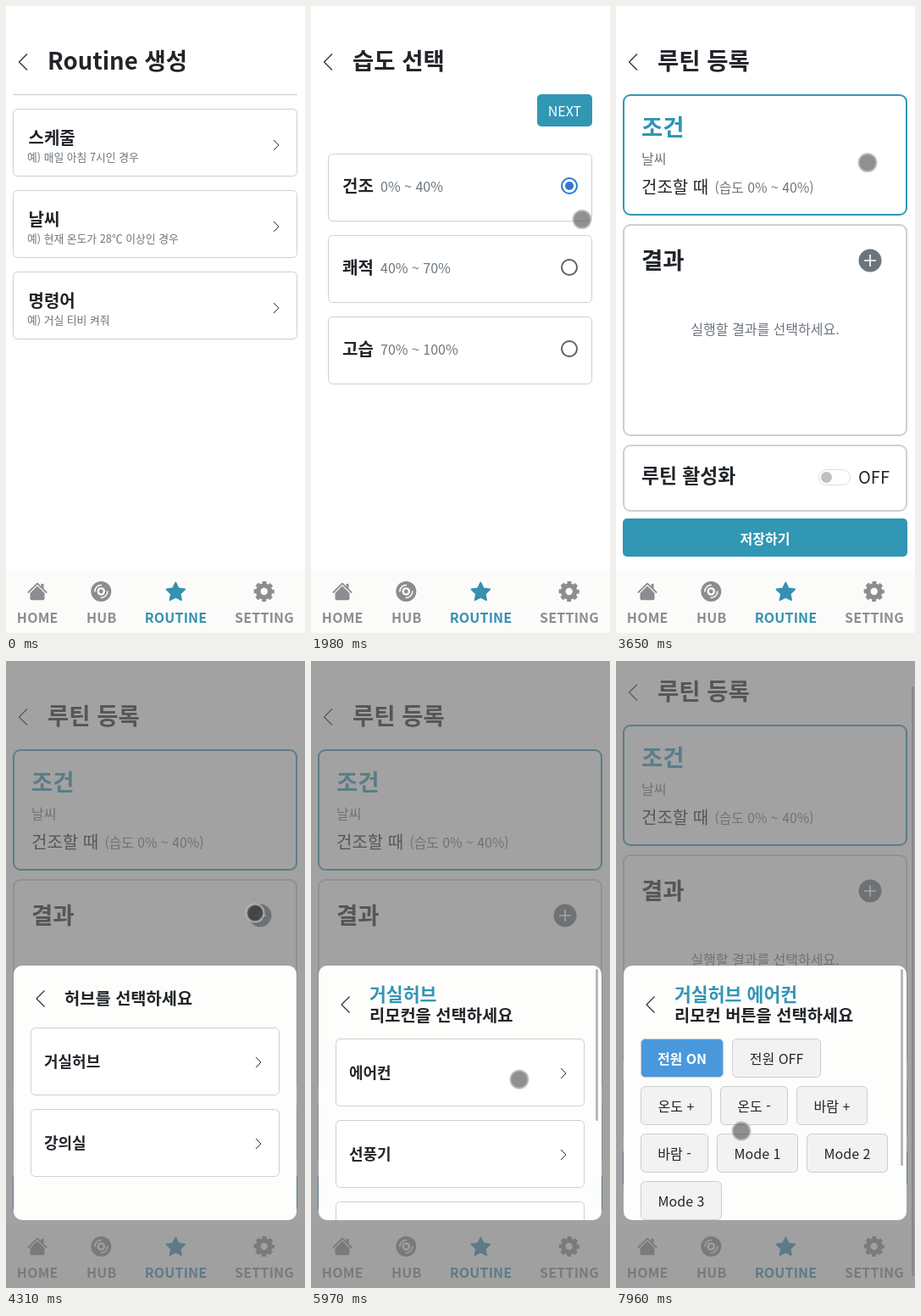
An HTML page that plays this animation: 353x739 px, repeating every 8000 ms.

```html
<!DOCTYPE html>
<html lang="ko">
<head>
<meta charset="utf-8">
<title>Routine</title>
<style>
html, body { margin: 0; width: 100%; height: 100%; overflow: hidden; background: #fff; }
svg { display: block; width: 353px; height: 739px; }
text { font-family: "Noto Sans CJK KR", "Noto Sans KR", "Noto Sans CJK", sans-serif; fill: #212529; white-space: pre; }
.b { font-weight: 700; }
.m { font-weight: 500; }
.grey { fill: #6c757d; }
.teal { fill: #3295b5; }
.white { fill: #fff; }
.mid { text-anchor: middle; }
.line { fill: none; stroke: #2b2f33; stroke-width: 1.2; }
.thin { stroke-width: 1; }
.card { fill: #fff; stroke: #cfcfcf; }
.panel { fill: #fff; stroke: #cfcfcf; stroke-width: 2; }
.key { fill: #f2f2f2; stroke: #cccccf; }
.lit { fill: #4998dc; stroke: #cccccf; }
.nav text { font-size: 16px; letter-spacing: .2px; fill: #8b8d91; }
.nav .on { fill: #3690b0; }
.icon { fill: #8b8d91; stroke: none; }

/* hard cuts between views */
.cut { animation: 8s step-end infinite; }
#create { animation-name: create; }
#humid { animation-name: humid; }
#register { animation-name: register; }
#dim { animation-name: dim; }
#hubs { animation-name: hubs; }
#remotes { animation-name: remotes; }
#keys { animation-name: keys; }
#power { animation-name: power; }
#bar { animation-name: bar; }
#core { animation-name: press; }
@keyframes create { 0% { opacity: 1 } 24.75%, 100% { opacity: 0 } }
@keyframes humid { 0% { opacity: 0 } 24.75% { opacity: 1 } 39.75%, 100% { opacity: 0 } }
@keyframes register { 0% { opacity: 0 } 39.75%, 100% { opacity: 1 } }
@keyframes dim { 0% { opacity: 0 } 50.62%, 100% { opacity: 1 } }
@keyframes hubs { 0% { opacity: 0 } 50.62% { opacity: 1 } 64%, 100% { opacity: 0 } }
@keyframes remotes { 0% { opacity: 0 } 64% { opacity: 1 } 79.62%, 100% { opacity: 0 } }
@keyframes keys { 0% { opacity: 0 } 79.62%, 100% { opacity: 1 } }
@keyframes power { 0% { opacity: 0 } 92.9%, 100% { opacity: 1 } }
@keyframes bar { 0% { opacity: 0 } 95.6%, 100% { opacity: 1 } }
@keyframes press {
  0% { opacity: 0 } 12.2% { opacity: 1 } 14% { opacity: 0 }
  23% { opacity: 1 } 24.7% { opacity: 0 }
  37.5% { opacity: 1 } 39.75% { opacity: 0 }
  49.5% { opacity: 1 } 54.5% { opacity: 0 }
  62.2% { opacity: 1 } 63.8% { opacity: 0 }
  78% { opacity: 1 } 79.62% { opacity: 0 }
  90.3% { opacity: 1 } 92.8%, 100% { opacity: 0 }
}

/* scrolling and pointer travel */
#page { animation: scroll 8s linear infinite; }
#thumb { animation: thumb 8s linear infinite; }
#pointer { animation: travel 8s linear infinite, appear 8s step-end infinite; }
@keyframes scroll {
  0%, 95.6% { transform: translateY(0); animation-timing-function: ease-in }
  99.5%, 100% { transform: translateY(-29px) }
}
@keyframes thumb {
  0%, 95.6% { transform: translateY(0); animation-timing-function: ease-in }
  99.5%, 100% { transform: translateY(27px) }
}
@keyframes appear { 0% { opacity: 0 } 1.5%, 100% { opacity: 1 } }
@keyframes travel {
  0%, 1.5% { transform: translate(296px, 685px) }
  5% { transform: translate(292px, 588px) }
  7.5% { transform: translate(275px, 515px) }
  11.5% { transform: translate(319px, 254px) }
  12.25%, 26% { transform: translate(320px, 251.5px) }
  33%, 35% { transform: translate(313px, 273px) }
  37.12%, 40.5% { transform: translate(299px, 135px) }
  45.62% { transform: translate(297px, 184px) }
  48.8% { transform: translate(294px, 297px) }
  54.5% { transform: translate(294px, 297px); animation-timing-function: ease-in-out }
  61.5%, 72.1% { transform: translate(262px, 493px) }
  74.62% { transform: translate(246px, 493px) }
  77.87%, 80% { transform: translate(213px, 514px); animation-timing-function: ease-in-out }
  89.5%, 93% { transform: translate(101px, 471px); animation-timing-function: ease-in-out }
  99%, 100% { transform: translate(148px, 554px) }
}
</style>
</head>
<body>
<script>
const TEAL = '#3197b4';
const TITLE = 27.5;

const text = (x, y, size, str, cls = '') =>
  `<text x="${x}" y="${y}" font-size="${size}" class="${cls}">${str}</text>`;
const box = (x, y, w, h, r, attrs) =>
  `<rect x="${x}" y="${y}" width="${w}" height="${h}" rx="${r}" ${attrs}/>`;
const card = (x, y, w, h = 79, cls = 'card') => box(x + .5, y + .5, w, h, 5, `class="${cls}"`);
const path = (d, attrs = 'class="line"') => `<path d="${d}" ${attrs}/>`;
const dot = (x, y, r, attrs) => `<circle cx="${x}" cy="${y}" r="${r}" ${attrs}/>`;
const next = (x, y) => path(`M${x - 3} ${y - 6}l6 6l-6 6`, 'class="line thin"');
const back = (x, y) => path(`M${x + 5} ${y - 9.5}l-9.5 9.5l9.5 9.5`, 'class="line" stroke-linejoin="round"');
const view = (id, body) => `<g id="${id}" class="cut">${body}</g>`;
const header = title => back(20, 66) + text(49, 75, TITLE, title, 'b');

const create = view('create', header('Routine 생성') + path('M8 104.5H344', 'stroke="#c8c8c8"') + [
  ['스케줄', '예) 매일 아침 7시인 경우'],
  ['날씨', '예) 현재 온도가 28℃ 이상인 경우'],
  ['명령어', '예) 거실 티비 켜줘'],
].map(([name, hint], i) => {
  const y = 121 + 96 * i;
  return card(8, y, 335) + text(26.5, y + 41.5, 20, name, 'b') +
    text(25, y + 61.5, 12.8, hint, 'grey') + next(319, y + 43);
}).join(''));

const humid = view('humid', box(0, 0, 353, 664, 0, 'fill="#fff"') + header('습도 선택') +
  box(267, 104, 65, 38, 5, `fill="${TEAL}"`) + text(299.5, 130, 16, 'NEXT', 'm white mid') + [
  ['건조', '0% ~ 40%'],
  ['쾌적', '40% ~ 70%'],
  ['고습', '70% ~ 100%'],
].map(([name, range], i) => {
  const y = 174 + 96 * i, picked = i === 0;
  return card(20, y, 311) + text(37, y + 45.5, 20, name, 'b') + text(82, y + 45, 16, range, 'grey') +
    dot(305, y + 38, 9, `fill="none" stroke-width="2" stroke="${picked ? '#2b79d0' : '#5f6062'}"`) +
    (picked ? dot(305, y + 38, 5, 'fill="#2b79d0"') : '');
}).join(''));

const panel = (y, h, attrs = '') => box(9, y, 334, h, 8, `class="panel" ${attrs}`);
const register = view('register', box(0, 0, 353, 790, 0, 'fill="#fff"') + header('루틴 등록') +
  panel(105, 141, `style="stroke:${TEAL}"`) +
  text(30, 153, TITLE, '조건', 'b teal') + text(30, 185.5, 16, '날씨', 'grey') +
  text(30, 220.5, 20, '건조할 때', 'm') + text(116.5, 219.5, 15.8, '(습도 0% ~ 40%)', 'grey') +
  panel(258, 248) + text(30, 310, TITLE, '결과', 'b') +
  dot(300, 300, 13.5, 'fill="#6c757d"') + path('M293 300h14M300 293v14', 'stroke="#fff" stroke-width="1.7"') +
  text(176, 386.5, 16, '실행할 결과를 선택하세요.', 'grey mid') +
  panel(518, 77) + text(30, 562, 22.8, '루틴 활성화', 'b') +
  box(239.5, 546.5, 37, 18, 9, 'fill="#fff" stroke="#dcdee0"') + dot(248.5, 555.5, 6.5, 'fill="#bfbfbf"') +
  text(286, 563, 20, 'OFF') +
  box(8, 604, 336, 45, 5, `fill="${TEAL}"`) + text(176, 634, 16, '저장하기', 'b white mid'));

// five-pointed star
const star = Array.from({ length: 10 }, (_, i) => {
  const a = Math.PI * (i / 5 - .5), r = i % 2 ? 5.6 : 11.4;
  return (200.3 + r * Math.cos(a)).toFixed(2) + ' ' + (691 + r * Math.sin(a)).toFixed(2);
}).join('L');
const nav = `<g class="nav">${box(0, 664, 353, 75, 0, 'fill="#fbfbfa"')}
  ${path('M37 683.5l8.5 8.4v6.6a1.7 1.7 0 0 1-1.7 1.7H30.2a1.7 1.7 0 0 1-1.7-1.7v-6.6zM41.5 681h3v6l-3-3z', 'class="icon"')}
  ${path('M26.4 691L37 680.6L47.6 691', 'fill="none" stroke="#8b8d91" stroke-width="1.8" stroke-linecap="round" stroke-linejoin="round"')}
  ${dot(112.3, 690, 12, 'class="icon"')}
  ${dot(112.3, 690, 3.6, 'fill="none" stroke="#fbfbfa" stroke-width="2.4"')}
  ${path('M104.8 690a7.5 7.5 0 0 1 7.5-7.5M119.8 690a7.5 7.5 0 0 1-7.5 7.5', 'fill="none" stroke="#fbfbfa" stroke-width="1.6" stroke-linecap="round"')}
  ${path('M' + star + 'Z', 'fill="#3690b0" stroke="#3690b0" stroke-width="1.8" stroke-linejoin="round"')}
  ${dot(304.7, 690, 7, 'fill="none" stroke="#8b8d91" stroke-width="5.6"')}
  ${dot(304.7, 690, 10.3, 'fill="none" stroke="#8b8d91" stroke-width="3.6" stroke-dasharray="4.8 3.29" stroke-dashoffset="2.4"')}
  ${[['HOME', 37.2], ['HUB', 112.7], ['ROUTINE', 200.5], ['SETTING', 305]]
    .map(([s, x]) => text(x, 727, 16, s, 'b mid' + (s === 'ROUTINE' ? ' on' : ''))).join('')}
</g>`;

const sheet = (id, body) => view(id, box(9, 359, 334, 300, 10, 'fill="#fdfdfc"') +
  `<g clip-path="url(#sheetClip)">${body}</g>`);
const row = (y, name) => card(29, y, 293) + text(45, y + 46.5, 18, name, 'b') + next(298, y + 41);
const slider = h => box(336, 363, 3, h, 1.5, 'fill="#b8b8b8"');
const heading = (top, sub) => back(40.5, 405) + text(69, 400.5, 21.6, top, 'b teal') + text(69, 424.5, 19.8, sub, 'b');

const hubs = sheet('hubs', back(40.5, 398) + text(69, 404.5, 19.8, '허브를 선택하세요', 'b') +
  row(432, '거실허브') + row(528, '강의실'));
const remotes = sheet('remotes', heading('거실허브', '리모컨을 선택하세요') +
  row(445, '에어컨') + row(541, '선풍기') + card(29, 637, 293) + slider(179));

const key = (x, y, w, name, box = 'key', weight = '') =>
  card(x, y, w - 1, 45, box) + text(x + w / 2, y + 29.5, 16, name, 'mid ' + weight);
const layout = [
  [['전원 ON', 98], ['전원 OFF', 105]],
  [['온도 +', 84], ['온도 -', 80], ['바람 +', 84]],
  [['바람 -', 80], ['Mode 1', 96], ['Mode 2', 96]],
  [['Mode 3', 96]],
];
const pad = layout.map((line, i) => {
  let x = 29;
  return line.map(([name, w]) => {
    const k = key(x, 445 + 56 * i, w, name);
    x += w + 10;
    return k;
  }).join('');
}).join('');
const power = view('power', key(29, 445, 98, '전원 ON', 'lit', 'b white'));
const keys = sheet('keys', heading('거실허브 에어컨', '리모컨 버튼을 선택하세요') + pad + power + slider(232));

document.body.innerHTML = `<svg viewBox="0 0 353 739" width="353" height="739">
  <defs><clipPath id="sheetClip">${box(9, 359, 334, 300, 10, '')}</clipPath></defs>
  <g id="page">${create}${humid}${register}</g>
  ${nav}
  ${view('dim', box(0, 0, 353, 739, 0, 'fill="rgb(113,113,113)" fill-opacity=".65"'))}
  ${view('bar', box(349, 3, 3, 695, 1.5, 'id="thumb" fill="#8a8a8a"'))}
  ${hubs}${remotes}${keys}
  <g id="pointer">
    ${dot(0, 0, 10.5, 'fill="#464646" fill-opacity=".6" stroke="#b9b9b9" stroke-opacity=".8" stroke-width="2"')}
    ${dot(0, 0, 8.5, 'id="core" class="cut" fill="#28282c" fill-opacity=".4"')}
  </g>
</svg>`;
</script>
</body>
</html>
```
